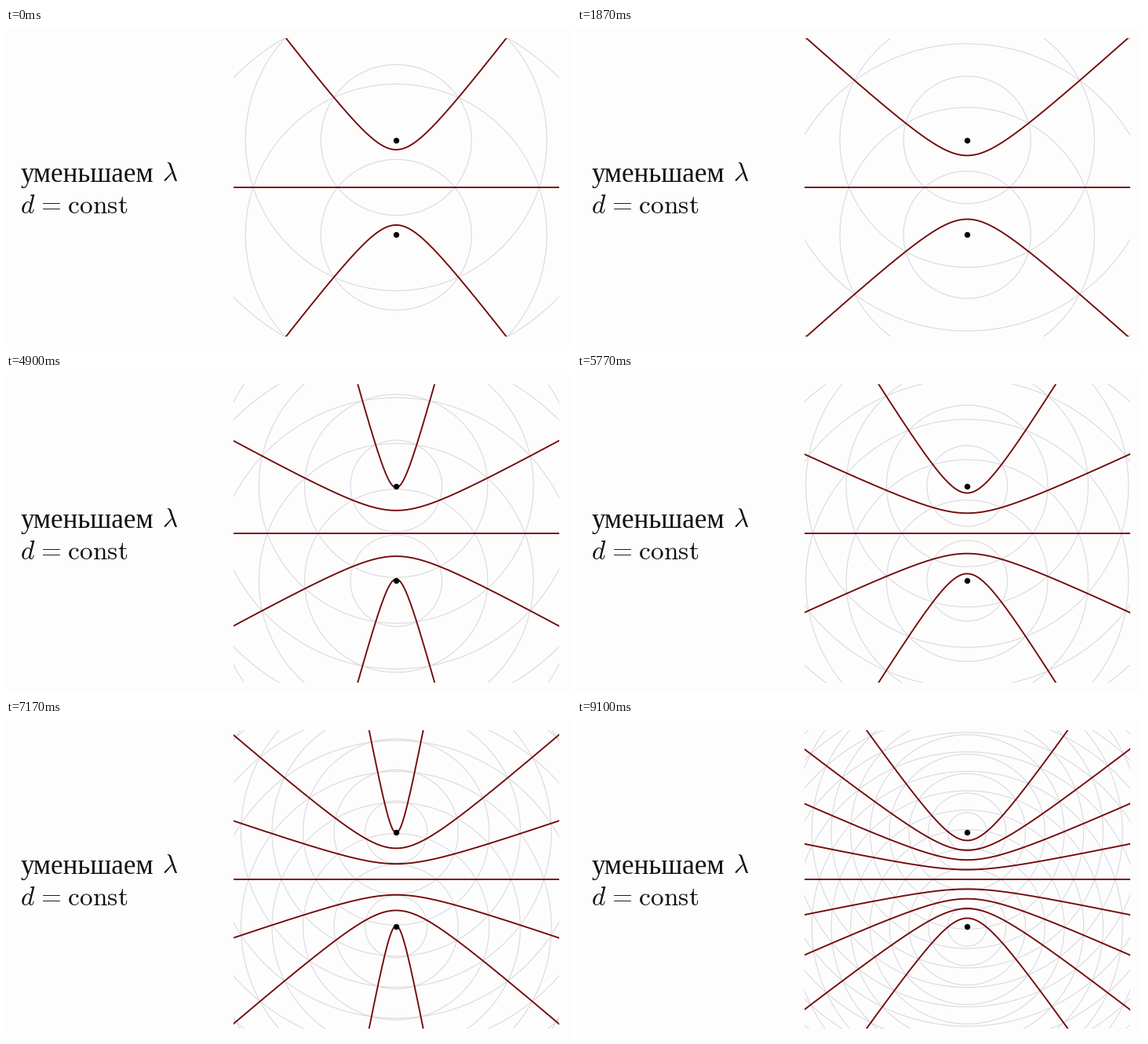
A matplotlib script for the animation above (9210 ms loop, 720 by 405 pixels).

```python
import numpy as np
import matplotlib.pyplot as plt
from matplotlib.animation import FuncAnimation
from matplotlib.patches import Rectangle

plt.rcParams["mathtext.fontset"] = "cm"

W, H, DPI = 720, 405, 72          # at 72 dpi one point is one pixel
STEP, FRAMES = 30, 307            # 9210 ms per loop
CX, CY, C = 497.2, 202.95, 60.4   # midpoint and half distance of the sources
X0, X1, Y0, Y1 = 290, 705, 13, 393
PAPER, RING, CURVE, INK = "#fdfdfd", "#d9d9e0", "#740a0a", "#101010"

# Wavelength in pixels over time in ms
TIMES = [0, 1860, 3510, 4890, 5760, 7170, 9090]
WAVES = [96, 81.1, 69.2, 58.3, 51.4, 39.55, 24.75]

fig = plt.figure(figsize=(W / DPI, H / DPI), dpi=DPI, facecolor=PAPER)
ax = fig.add_axes([0, 0, 1, 1])
ax.set(xlim=(0, W), ylim=(H, 0))
ax.axis("off")
window = Rectangle((X0, Y0), X1 - X0, Y1 - Y0, transform=ax.transData)


def clipped_line(color, width):
    line, = ax.plot([], [], color=color, lw=width, solid_capstyle="butt")
    line.set_clip_path(window)
    return line


rings = clipped_line(RING, 1.1)
curves = clipped_line(CURVE, 1.9)
ax.plot([CX, CX], [CY - C, CY + C], "o", color="black", ms=7.4, mew=0, zorder=5)

ax.text(18.5, 195.5, "уменьшаем", family="Liberation Serif", size=35, color=INK)
ax.text(199, 195.5, r"$\lambda$", size=33, color=INK)
ax.text(18, 236, r"$d\hspace{0.1}=\hspace{0.1}\mathrm{const}$", size=33.4, color=INK)

ANGLE = np.linspace(0, 2 * np.pi, 181)
SPAN = np.linspace(-1, 1, 161)
REACH = np.hypot(CX - X0, CY + C - Y0)


def joined(parts):
    """Chain polylines into one, with gaps between them."""
    gap = np.full((2, 1), np.nan)
    return np.hstack([p for part in parts for p in (np.array(part), gap)])


def ring_parts(wave):
    for r in np.arange(wave, REACH + 2, wave):
        for cy in (CY - C, CY + C):
            yield CX + r * np.cos(ANGLE), cy + r * np.sin(ANGLE)


def curve_parts(wave):
    # Points whose path difference is a whole number of wavelengths
    top = int(2 * C / wave)
    for n in range(-top, top + 1):
        a = n * wave / 2
        b = np.sqrt(max(C * C - a * a, 0.01))
        u = SPAN * np.arcsinh(209 / b)
        yield CX + b * np.sinh(u), CY + a * np.cosh(u)


def draw(i):
    wave = np.interp(i * STEP, TIMES, WAVES)
    rings.set_data(*joined(ring_parts(wave)))
    curves.set_data(*joined(curve_parts(wave)))
    return rings, curves


anim = FuncAnimation(fig, draw, frames=FRAMES, interval=STEP, repeat=True,
                     repeat_delay=0, blit=False)
plt.show()
```
